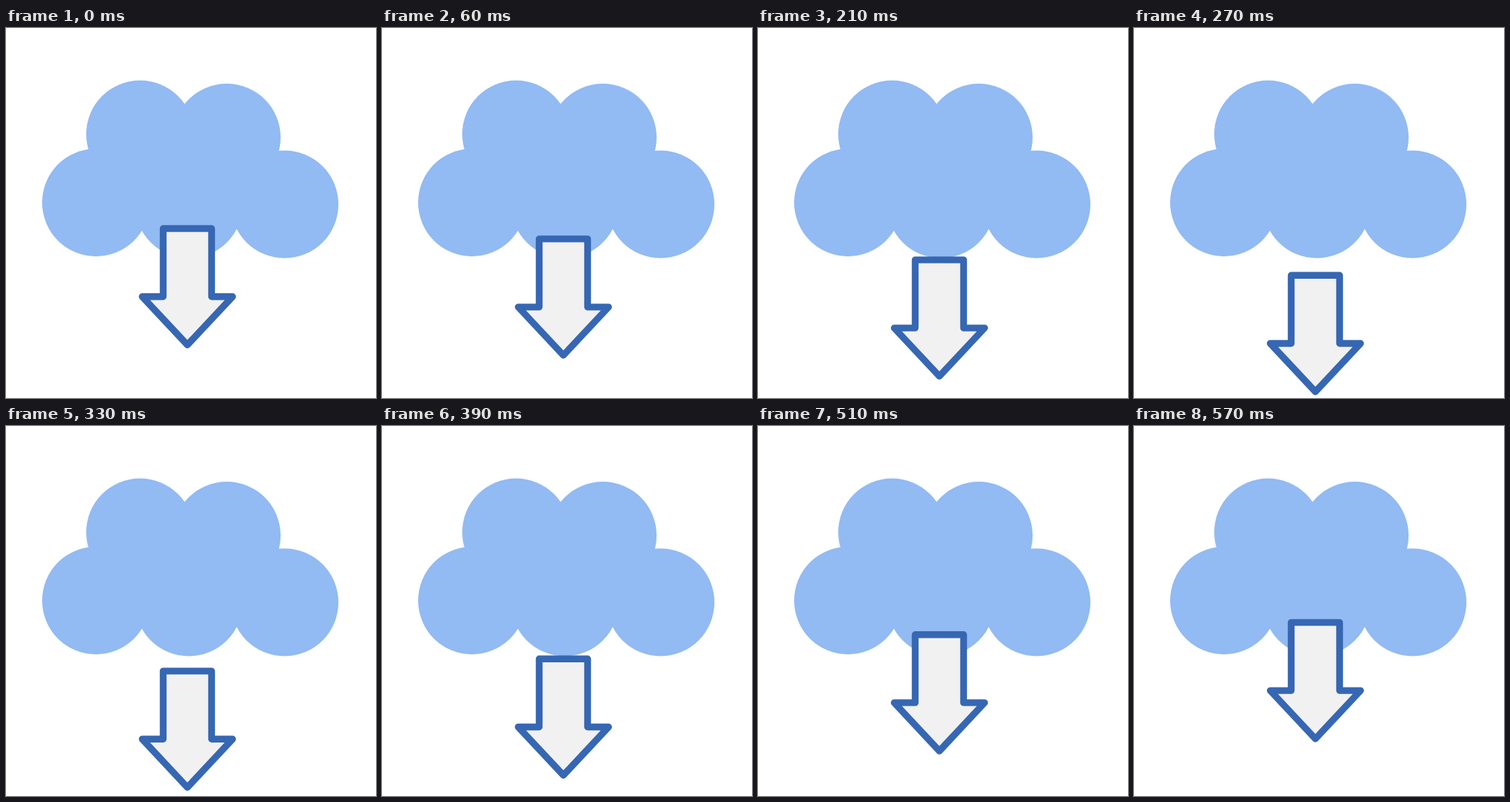
An HTML page for the animation above (0.6 s loop, 512 px wide and 512 px high).

```html
<!DOCTYPE html>
<html lang="en">
<head>
<meta charset="utf-8">
<title>Cloud download</title>
<style>
  html, body { margin: 0; width: 100%; height: 100%; overflow: hidden; background: #fff; }
  svg { display: block; width: 100vw; height: 100vh; }
</style>
</head>
<body>
<svg viewBox="0 0 512 512">
  <g fill="#92baf3">
    <circle cx="124.5" cy="241.5" r="74.5"/>
    <circle cx="185.5" cy="147" r="74.5"/>
    <circle cx="305.5" cy="151.5" r="74.5"/>
    <circle cx="385.5" cy="244" r="74.5"/>
    <circle cx="253" cy="244" r="74.5"/>
    <path d="M124.5 241.5 185.5 147 305.5 151.5 385.5 244Z"/>
  </g>
  <path id="arrow" d="M217.5 277.5H284.5V371.7H313.5L251 438.5 188.5 371.7H217.5Z"
    fill="#f1f1f1" stroke="#3667b3" stroke-width="9.4" stroke-linejoin="round"/>
</svg>
<script>
  const LOOP = 600, STEP = 30;
  const TOP = -5.6, BOTTOM = 64.8;     // travel of the arrow in px
  const TURN = 270, LAST = LOOP - STEP; // end of the drop, end of the rise
  const RISE = 0.28;                   // px per ms
  const arrow = document.getElementById('arrow');

  // An even drop that lags briefly before the end.
  function drop(t) {
    const lag = 7 * Math.max(0, 1 - Math.abs(t - 210) / 60);
    return BOTTOM * t / TURN - lag;
  }

  // A short rest at the bottom, then an even rise.
  const rise = t => Math.min(BOTTOM, TOP + RISE * (LAST - t));

  const start = performance.now();
  function draw() {
    const elapsed = (performance.now() - start) % LOOP;
    const t = Math.floor(elapsed / STEP) * STEP;
    const y = t <= TURN ? drop(t) : rise(t);
    arrow.setAttribute('transform', `translate(0 ${y.toFixed(2)})`);
    requestAnimationFrame(draw);
  }
  draw();
</script>
</body>
</html>
```
